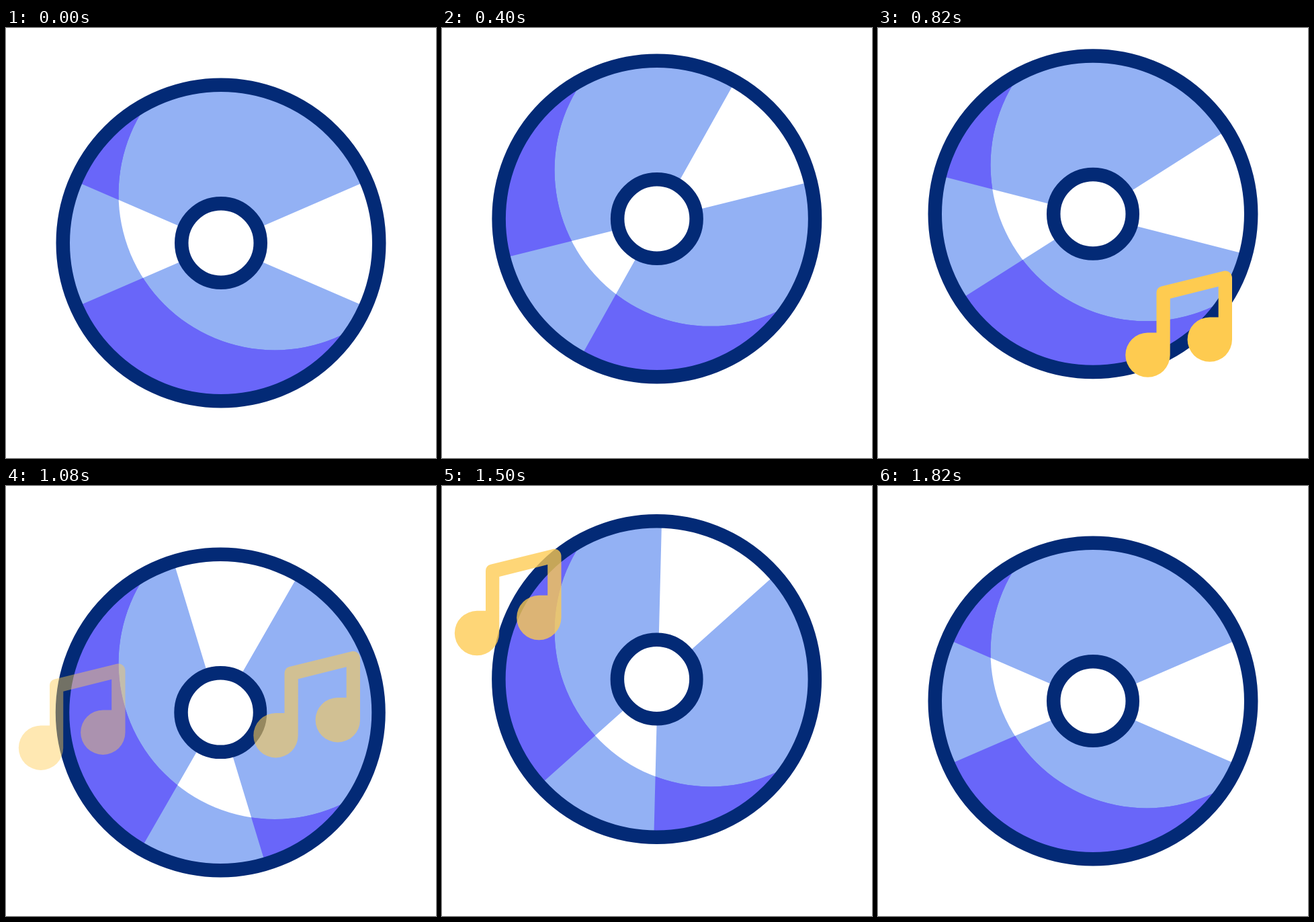
An HTML page with a canvas that plays this animation: 640 px wide and 640 px high, repeating every 2400 ms.

```html
<!DOCTYPE html>
<html lang="en">
<head>
<meta charset="utf-8">
<title>Spinning disc</title>
<style>
  html, body { margin: 0; width: 100%; height: 100%; overflow: hidden; background: #fff; }
  canvas { display: block; }
</style>
</head>
<body>
<canvas id="stage" width="640" height="640"></canvas>
<script>
const ctx = document.getElementById('stage').getContext('2d');
const LOOP = 2400;
const NAVY = '#032a76', BLUE = '#93b1f4', VIOLET = '#6966f9', YELLOW = '#fecb50', WHITE = '#fff';
const RAD = Math.PI / 180, TAU = Math.PI * 2;
const WEDGE = 23.4 * RAD;

// Keys are [time, value]
const bounce = [[0, 320], [700, 260.7], [1160, 345], [1475, 287], [1820, 320]];
const spin = [[0, 0], [580, -48], [1820, 360]];

// Both notes rise and fade alike, one after the other
const RISE = 217, RISE_TIME = 625, FADE_IN = 105, FADE_OUT = 185, LIFE = 610;
const notes = [
  { start: 580, x: 0, y: 74 },
  { start: 1035, x: -349.5, y: -90.5 }
];

const clamp = v => Math.max(0, Math.min(1, v));

// Blend of linear (soft 0) and sine easing (soft 1)
function ease(u, soft) {
  return u + soft * ((1 - Math.cos(Math.PI * u)) / 2 - u);
}

function track(keys, t, soft) {
  let value = keys[0][1];
  for (let i = 1; i < keys.length; i++) {
    const [t0, a] = keys[i - 1], [t1, b] = keys[i];
    value += (b - a) * ease(clamp((t - t0) / (t1 - t0)), soft);
  }
  return value;
}

function circle(x, y, r) {
  ctx.beginPath();
  ctx.arc(x, y, r, 0, TAU);
}

function fill(color) {
  ctx.fillStyle = color;
  ctx.fill();
}

function ring(x, y, r) {
  circle(x, y, r);
  ctx.lineWidth = 20.5;
  ctx.strokeStyle = NAVY;
  ctx.stroke();
}

function bowTie(x, y, angle, color) {
  ctx.beginPath();
  for (const a of [angle, angle + Math.PI]) {
    ctx.moveTo(x, y);
    ctx.arc(x, y, 240, a - WEDGE, a + WEDGE);
    ctx.closePath();
  }
  fill(color);
}

function drawDisc(t) {
  const angle = track(spin, t, 0.95) * RAD;
  const cos = Math.cos(angle), sin = Math.sin(angle);
  // The disc turns slightly off its centre
  const x = 0.65 * (cos - 1), y = 0.65 * sin;
  const tie = [x - 1.7 * sin, y + 1.7 * cos, angle];

  ctx.save();
  ctx.translate(320, track(bounce, t, 0.7));

  ctx.save();
  circle(x, y, 235);
  ctx.clip();
  fill(VIOLET);
  bowTie(...tie, BLUE);
  circle(80, -73, 232.5);
  ctx.clip();
  fill(BLUE);
  bowTie(...tie, WHITE);
  ctx.restore();

  circle(x, y, 55);
  fill(WHITE);
  ring(x, y, 58.75);
  ring(x, y, 235.25);
  ctx.restore();
}

function drawNote({ start, x, y }, t) {
  const age = t - start;
  const alpha = clamp(age / FADE_IN) * clamp((LIFE - age) / FADE_OUT);
  if (alpha === 0) return;
  ctx.save();
  ctx.globalAlpha = alpha;
  ctx.translate(x, y - RISE * ease(clamp(age / RISE_TIME), 0.7));
  ctx.beginPath();
  ctx.moveTo(414.5, 453.8);
  ctx.lineTo(414.5, 394.5);
  ctx.quadraticCurveTo(414.5, 386.8, 422, 384.8);
  ctx.lineTo(514.5, 362);
  ctx.bezierCurveTo(521, 360.5, 527, 365.5, 527, 372);
  ctx.arc(493.8, 464, 33.2, 0, TAU * 0.75);
  ctx.lineTo(506.7, 430.8);
  ctx.lineTo(506.7, 385);
  ctx.lineTo(434.8, 403);
  ctx.arc(401.5, 487, 33.2, 0, TAU * 0.75);
  ctx.closePath();
  fill(YELLOW);
  ctx.restore();
}

function draw(t) {
  ctx.fillStyle = WHITE;
  ctx.fillRect(0, 0, 640, 640);
  drawDisc(t);
  for (const note of notes) drawNote(note, t);
}

const begin = performance.now();
function tick() {
  draw((performance.now() - begin) % LOOP);
  requestAnimationFrame(tick);
}
tick();
</script>
</body>
</html>
```
